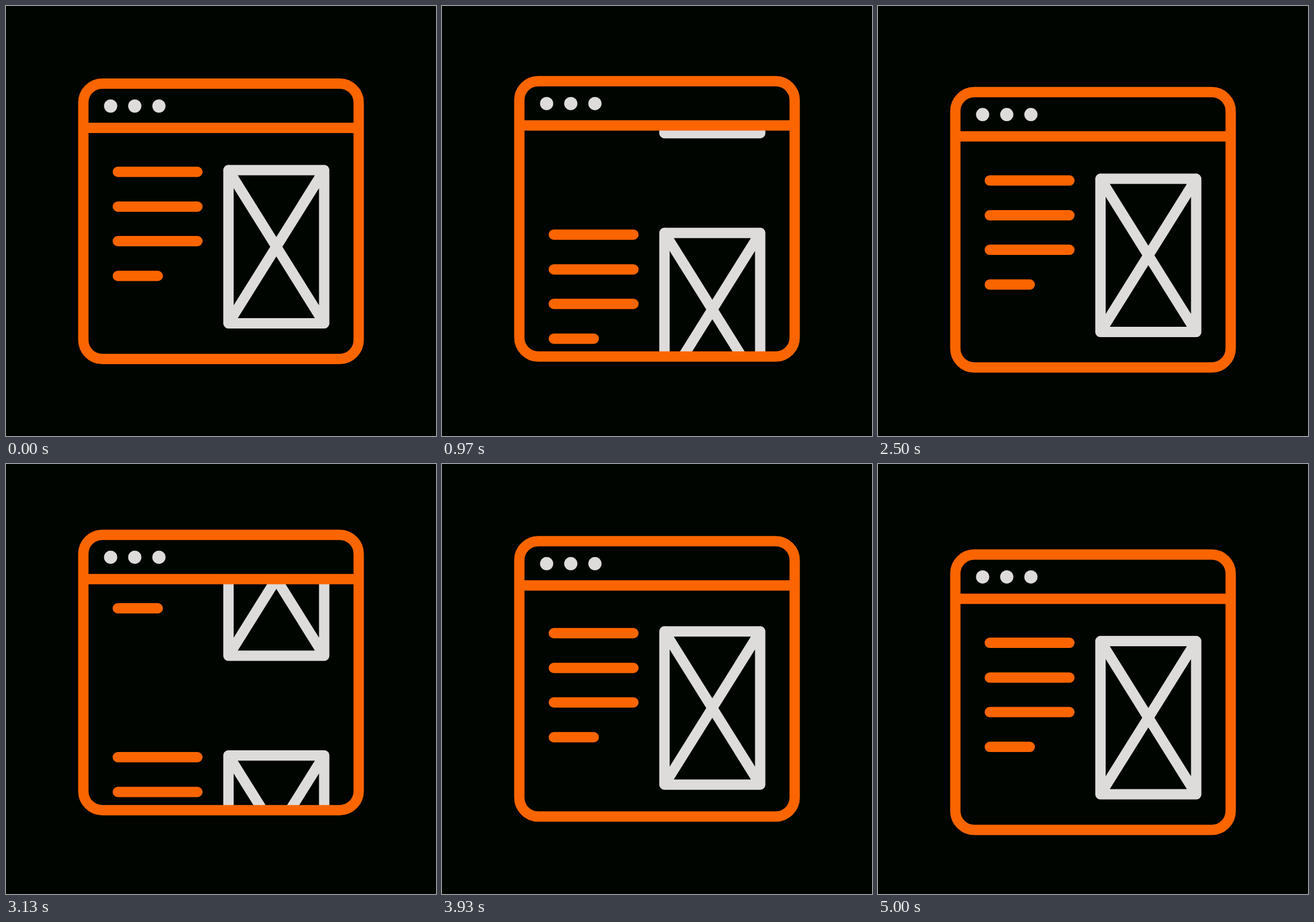
Recreate the animation shown at these times as an HTML page. Size 748 px wide and 748 px high, loop 5030 ms.

```html
<!DOCTYPE html>
<html lang="en">
<head>
<meta charset="utf-8">
<title>Scrolling page</title>
<style>
  html, body { margin: 0; width: 100%; height: 100%; overflow: hidden; background: #000500; }
  svg { display: block; width: 100%; height: 100%; }
  path, rect { fill: none; stroke-width: 18; stroke-linecap: round; stroke-linejoin: round; }
  .orange { stroke: #fb6500; }
  .white { stroke: #dddcdb; }
  circle { fill: #dddcdb; }
</style>
</head>
<body>
<svg viewBox="0 0 748 748">
  <defs>
    <clipPath id="view"><path id="hole" d="M135 212H613V614H135Z"/></clipPath>
    <g id="block">
      <path class="orange" d="M194.5 288.5H333M194.5 349H333M194.5 409H333M194.5 469.5H264"/>
      <path class="white" d="M387 285.5H553.5V552H387ZL553.5 552M553.5 285.5L387 552"/>
    </g>
  </defs>
  <g clip-path="url(#view)">
    <g id="page">
      <use href="#block"/>
      <use href="#block" y="440"/>
    </g>
  </g>
  <g id="frame">
    <rect class="orange" x="134.5" y="135" width="479" height="479" rx="33"/>
    <path class="orange" d="M135 212H613"/>
    <circle cx="182" cy="174" r="11.5"/>
    <circle cx="224" cy="174" r="11.5"/>
    <circle cx="266" cy="174" r="11.5"/>
  </g>
</svg>
<script>
const LOOP = 5030, CYCLE = 2364, PITCH = 440, PULL = 25, REST = -0.7;
const el = id => document.getElementById(id);

// cubic-bezier(.167, 0, 0, 1)
function ease(u) {
  if (u <= 0) return 0;
  if (u >= 1) return 1;
  let lo = 0, hi = 1;
  for (let i = 0; i < 24; i++) {
    const s = (lo + hi) / 2;
    if (0.5 * s * (1 - s) ** 2 + s ** 3 < u) lo = s; else hi = s;
  }
  return lo * lo * (3 - 2 * lo);
}

const move = (t, start, end, by) => by * ease((t - start) / (end - start));
const shift = (id, y) => el(id).setAttribute("transform", `translate(0 ${y.toFixed(2)})`);

function draw(time) {
  const t = time % CYCLE;
  const base = time < CYCLE ? 0 : REST;

  // pull down, fling up past rest, settle
  const frameY = base + move(t, 30, 480, PULL - base)
    + move(t, 512, 745, -12 - PULL) + move(t, 745, 1530, 12 + REST);
  const pageY = move(t, 30, 480, PULL) + move(t, 512, 1802, -PITCH - PULL);

  shift("frame", frameY);
  shift("hole", frameY);
  shift("page", pageY);
}

const begin = performance.now();
function tick() {
  draw((performance.now() - begin) % LOOP);
  requestAnimationFrame(tick);
}
tick();
</script>
</body>
</html>
```
